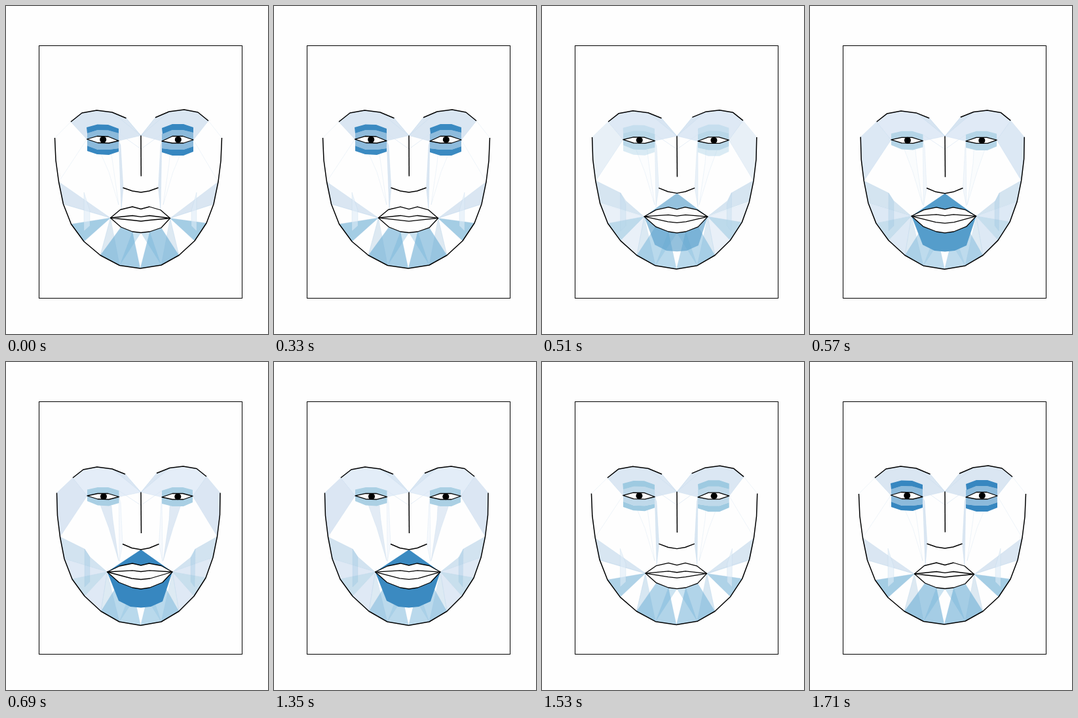
Write an HTML page without scripts that moves like this. It is 400x500 px and loops after 2.04 s.

```html
<!DOCTYPE html>
<html lang="en">
<head>
<meta charset="utf-8">
<title>Face morph</title>
<style>
html, body { margin: 0; width: 100%; height: 100%; overflow: hidden; background: #fefefe; }
svg { display: block; width: 100%; height: 100%; }

/* Cubic in-out sampled every 60 ms, held, then played back */
:root {
  --steps: linear(0 0% 16.17%, .0117 16.17% 19.11%, .0933 19.11% 22.05%,
    .3149 22.05% 24.99%, .6851 24.99% 27.94%, .9067 27.94% 30.88%,
    .9883 30.88% 33.82%, 1 33.82% 66.17%, .9883 66.17% 69.11%,
    .9067 69.11% 72.05%, .6851 72.05% 74.99%, .3149 74.99% 77.94%,
    .0933 77.94% 80.88%, .0117 80.88% 83.82%, 0 83.82% 100%);
}
path { d: var(--p); fill: none; animation: morph 2040ms var(--steps) infinite; }
@keyframes morph { from { d: var(--p); } to { d: var(--q); } }

/* Each shade passes through four tints: --a, --c, --d, --b */
.shades path {
  fill: var(--a);
  animation: morph 2040ms var(--steps) infinite, tint 2040ms step-end infinite;
}
@keyframes tint {
  0%, 83.82%, 100% { fill: var(--a); }
  16.17%, 80.88% { fill: color-mix(in srgb, var(--a), var(--c) 4%); }
  19.11%, 77.94% { fill: color-mix(in srgb, var(--a), var(--c) 30%); }
  22.05%, 74.99% { fill: var(--c); }
  24.99%, 72.05% { fill: color-mix(in srgb, var(--c), var(--d) 62.5%); }
  27.94%, 69.11% { fill: var(--d); }
  30.88%, 66.17% { fill: color-mix(in srgb, var(--d), var(--b) 87%); }
  33.82% { fill: var(--b); }
}
.shades { stroke: rgb(158 196 225 / .28); stroke-width: .6; }
.brow { --a: #dae6f2; --c: #dbe7f3; --d: #e0eaf6; --b: #e4edf8; }
.ridge { --a: #dae6f200; --c: #dae6f200; --d: #d6e4f1; --b: #dae6f3; }
.temple { --a: #dce8f400; --c: #dce8f400; --d: #dce8f4; --b: #dbe6f3; }
.nose { --a: #dae6f2; --c: #d8e6f2; --d: #f3f7fb; --b: #f6f9fd; }
.tear { --a: #dfe9f400; --c: #dfe9f400; --d: #dfe9f420; --b: #dfe9f4; }
.cheek { --a: #dae6f2; --c: #d8e6f2; --d: #d4e4f0; --b: #d2e3f0; }
.side { --a: #dde9f500; --c: #dde9f500; --d: #dde9f5; --b: #dfe9f5; }
.jaw { --a: #a4cde4; --c: #aed2e7; --d: #c6deed; --b: #c8dfed; }
.fold { --a: #bed6e880; --c: #b9d6e98c; --d: #bed8ea80; --b: #bed8ea80; }
.patch { --a: #deebf799; --c: #deebf799; --d: #6baed62b; --b: #6baed633; }
.chin { --a: #6baed699; --c: #6baed685; --d: #6baed670; --b: #6baed678; }
.slice { --a: #6baed659; --c: #6baed659; --d: #6baed630; --b: #6baed633; }
.lid { --a: #8cbadb; --c: #bfd9ea; --d: #b5d5e7; --b: #a9cfe4; stroke: none; }
.shadow { --a: #3787c0; --c: #9ecae1; --d: #9ecae100; --b: #9ecae100; stroke: none; }
.muzzle { --a: #6baed600; --c: #6baed600; --d: #559dcb; --b: #3787c0; stroke: none; }

.lines { stroke: #000; stroke-width: 1.5; stroke-linejoin: round; }
.lines .open { fill: #fefefe; stroke-width: 1.3; }
.lines .pupil { stroke-width: 10; stroke-linecap: round; }
</style>
</head>
<body>
<svg viewBox="0 0 400 500">
<rect x="50.5" y="60.5" width="310" height="385" fill="#fefefe" stroke="#000"/>

<g class="shades">
  <!-- forehead and temples -->
  <path class="temple" style="--p:path('M74.5,201L99,176.5 123.5,203 80.5,268 76,235Z');--q:path('M77.5,199.5L102,176.5 124,204 82.5,266.5 78.5,234Z')"/>
  <path class="temple" style="--p:path('M329.5,201L309,175 286,204 324,268 328,236Z');--q:path('M327,199.5L306,174.5 285,204.5 322.5,266 326.5,233Z')"/>
  <path class="brow" style="--p:path('M99,176.5L116,163 138.5,159 162,162 183.5,171 206,197.5 172,205.5 123.5,203Z');--q:path('M102,176.5L118,164 139,160 162,163 182,171 206,198.5 172.5,205.5 124,204Z')"/>
  <path class="brow" style="--p:path('M309,175L293,162 272,158 249,161 228,170 206,197.5 238,206 286,204Z');--q:path('M306,174.5L291,162.5 270.5,159 250,161.5 230,169.5 206,198.5 238,206 285,204.5Z')"/>
  <path class="ridge" style="--p:path('M162,162L183.5,171 206,197.5Z');--q:path('M162,163L182,171 206,198.5Z')"/>
  <path class="ridge" style="--p:path('M249,161L228,170 206,197.5Z');--q:path('M250,161.5L230,169.5 206,198.5Z')"/>
  <path class="temple" style="--a:#fff0;--c:#fff0;--d:#fff0;--b:#fff0;stroke:#d5e3f1;--p:path('M172,194L206,218 238,195');--q:path('M172,196L206,218.5 238,196')"/>

  <!-- nose sides and under the eyes -->
  <path class="nose" style="--p:path('M172,205.5L175,212 179,277 176,312Z');--q:path('M172.5,205.5L175,214 178,277.5 173,304Z')"/>
  <path class="nose" style="--p:path('M238,206L236,212 232.5,277 236,312Z');--q:path('M238,206L237,214 233.5,277.5 239,304Z')"/>
  <path class="tear" style="--p:path('M142,219L160,219 163,240 172,303 157,253Z');--q:path('M144,218L161,219 163,240 172,303 157,253Z')"/>
  <path class="tear" style="--p:path('M269,219L251,219 249,240 240,303 255,253Z');--q:path('M267,218L250,219 249,240 240,303 255,253Z')"/>

  <!-- cheeks, fanning out from the corners of the mouth -->
  <path class="cheek" style="--p:path('M80.5,268L87.5,302 159.5,323Z');--q:path('M82.5,266.5L89,300 154.5,320 128,297 120,285Z')"/>
  <path class="cheek" style="--p:path('M324,268L317,302 250.5,323.5Z');--q:path('M322.5,266L316,298 254,320 283,297 289,285Z')"/>
  <path class="side" style="--p:path('M87.5,302L99.5,332.5 159.5,323Z');--q:path('M89,300L101,331 154.5,320Z')"/>
  <path class="side" style="--p:path('M317,302L306,331 250.5,323.5Z');--q:path('M316,298L305,329 254,320Z')"/>
  <path class="jaw" style="--p:path('M99.5,332.5L119,359 159.5,323Z');--q:path('M101,331L120,357 154.5,320Z')"/>
  <path class="jaw" style="--p:path('M306,331L288,358 250.5,323.5Z');--q:path('M305,329L287,357 254,320Z')"/>
  <path class="side" style="--p:path('M119,359L144,380 159.5,323Z');--q:path('M120,357L145,380 154.5,320Z')"/>
  <path class="side" style="--p:path('M288,358L264,380 250.5,323.5Z');--q:path('M287,357L264,380 254,320Z')"/>
  <path class="patch" style="--p:path('M119,284L128,312 128,335 119,343Z');--q:path('M120,285L128,297 128,335 120,343Z')"/>
  <path class="patch" style="--p:path('M291,284L283,312 283,335 291,343Z');--q:path('M289,285L282,297 282,335 288,343Z')"/>

  <!-- chin -->
  <path class="fold" style="--p:path('M159.5,323L144,380 173.5,395.5Z');--q:path('M154.5,320L145,380 173,396Z')"/>
  <path class="fold" style="--p:path('M250.5,323.5L264,380 237,395Z');--q:path('M254,320L264,380 237,396Z')"/>
  <path class="chin" style="--p:path('M175.5,337L193,344 205,400 173.5,395.5 144,380Z');--q:path('M172.5,336L193,344 205.5,401.5 173,396 145,380Z')"/>
  <path class="chin" style="--p:path('M237,338L219.5,344 205,400 237,395 264,380Z');--q:path('M239,336L219.5,344 205.5,401.5 237,396 264,380Z')"/>
  <path class="slice" style="--p:path('M193,344L206,345.5 173.5,395.5Z');--q:path('M193,344L206,346 173,396Z')"/>
  <path class="slice" style="--p:path('M219.5,344L206,345.5 237,395Z');--q:path('M219.5,344L206,346 237,396Z')"/>

  <!-- around the mouth -->
  <path class="muzzle" style="--p:path('M206,284L159.5,323 250.5,323.5Z');--q:path('M206,286L154.5,320 254,320Z')"/>
  <path class="muzzle" style="--p:path('M159.5,323L250.5,323.5 238,365 221,373 206,374 190,373 173,364Z');--q:path('M154.5,320L254,320 239,365 221,373 206,374.5 190,373 172,364Z')"/>

  <!-- eye bands -->
  <path class="lid" style="--p:path('M124,194L140,189 156,189.5 172,194 172,217 157,219 140,219 124,213Z');--q:path('M124,194.5L140,191 156,191 172.5,196 172.5,215 157,219.5 140,218.5 124,212Z')"/>
  <path class="lid" style="--p:path('M238,195L254,189 270,189 286,193 286,214 271,219 254,219 238,217Z');--q:path('M238,196L254,191 270,191 285,195 285,214 271,220 254,220 238,216Z')"/>
  <path class="shadow" style="--p:path('M123,185L139.5,180.5 156,181 172,187 172,194 156,189.5 140,189 124,194Z');--q:path('M124,186L140,182 156,182 172,187 172,196 156,191 140,191 124,194.5Z')"/>
  <path class="shadow" style="--p:path('M238,186L254,180 271,180 286,185 286,193 270,189 254,189 239,195Z');--q:path('M238,187L254,181 270,181 285,186 285,195 270,191 254,191 238,196Z')"/>
  <path class="shadow" style="--p:path('M124,213L140,219 157,219 172,217 172,222 157,227 139,226 124,221Z');--q:path('M124,212L140,218.5 157,219.5 172,215 172,223 157,228 140,227 124,221Z')"/>
  <path class="shadow" style="--p:path('M238,217L254,219 271,219 286,214 286,222 271,228 254,228 238,223Z');--q:path('M238,216L254,220 271,220 285,214 285,222 271,229 254,229 238,223Z')"/>
</g>

<g class="lines">
  <path style="--p:path('M74.5,201L76,235 80.5,268 87.5,302 99.5,332.5 119,359 144,380 173.5,395.5 205,400 237,395 264,380 288,358 306,331 317,302 324,268 328,236 329.5,201');--q:path('M77.5,199.5L78.5,234 82.5,266.5 89,300 101,331 120,357 145,380 173,396 205.5,401.5 237,396 264,380 287,357 305,329 316,298 322.5,266 326.5,233 327,199.5')"/>
  <!-- brows and nose -->
  <path style="--p:path('M99,176.5L116,163 138.5,159 162,162 183.5,171');--q:path('M102,176.5L118,164 139,160 162,163 182,171')"/>
  <path style="--p:path('M228,170L249,161 272,158 293,162 309,175');--q:path('M230,169.5L250,161.5 270.5,159 291,162.5 306,174.5')"/>
  <path style="--p:path('M206,197.5L206.3,259.5');--q:path('M206,198.5L206.5,261')"/>
  <path style="--p:path('M178.5,277L193,282 206,284 218.5,282 232.5,277');--q:path('M178,277.5L192,283.5 206,286 219,283.5 233.5,277.5')"/>
  <!-- eyes -->
  <path class="open" style="--p:path('M123.5,203L139,198.5 156,199 172,205.5 157,209 140,208.5Z');--q:path('M124,204L140,200.5 156,200.5 172.5,205.5 157,209.5 140,209Z')"/>
  <path class="open" style="--p:path('M238,206L254,198.5 270,198.5 286,204 271,209 254,209Z');--q:path('M238,206L254,200.5 270,200.5 285,204.5 271,209.5 254,209.5Z')"/>
  <path class="pupil" style="--p:path('M148.2,203.6L148.21,203.6');--q:path('M149,205L149.01,205')"/>
  <path class="pupil" style="--p:path('M262.8,203.8L262.81,203.8');--q:path('M262.3,205.2L262.31,205.2')"/>
  <!-- mouth -->
  <path class="open" style="--p:path('M159.5,323L174.5,310.5 193,306 206,309.5 219,306 236,311 250.5,323.5 237,338 219.5,344 206,345.5 193,344 175.5,337Z');--q:path('M154.5,320L173.5,311 193,307 206,310 218.5,307 237,310.5 254,320 239,336 219.5,344 206,346 193,344 172.5,336Z')"/>
  <path class="open" style="--p:path('M159.5,323L193,319.5 206,321.3 219,319.5 250.5,323.5 219,326.5 206,328 193,326.5Z');--q:path('M154.5,320L193,317.8 206,319.5 219,317.8 254,320 220,330 206,331.5 192,330Z')"/>
</g>
</svg>
</body>
</html>
```
